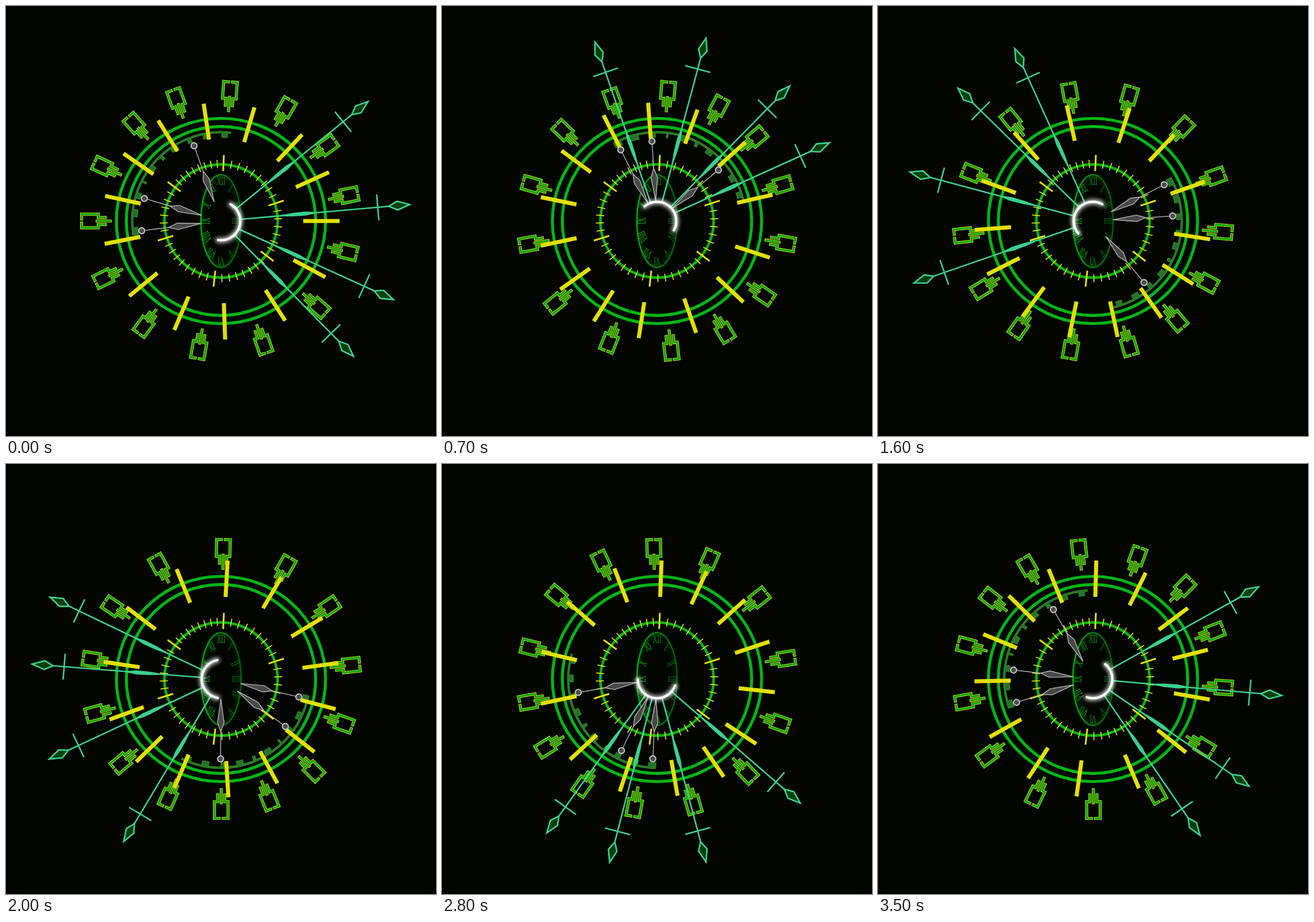
Recreate the animation shown at these times as an HTML page. Size 748 by 748 pixels, loop 3600 ms.

```html
<!DOCTYPE html>
<html lang="en">
<head>
<meta charset="utf-8">
<title>Clockwork</title>
<style>
  html, body { margin: 0; width: 100%; height: 100%; overflow: hidden; background: #020500; }
  svg { display: block; width: 100vw; height: 100vh; }
  text { font-family: "Liberation Serif", "Noto Serif", serif; font-size: 21px; text-anchor: middle; }
</style>
</head>
<body>
<svg viewBox="-374 -374 748 748">
  <defs>
    <filter id="glow" x="-60%" y="-60%" width="220%" height="220%">
      <feGaussianBlur stdDeviation="3.5"/>
    </filter>
    <linearGradient id="fade" gradientUnits="userSpaceOnUse" x1="-36" x2="36" y1="0" y2="0">
      <stop offset="0" stop-color="#08a812"/>
      <stop offset="1" stop-color="#045c08"/>
    </linearGradient>
    <g id="key">
      <path d="M3.6 2H11.8V31H6.2V43M-3.6 2H-11.8V31H-6.2V43M0 29V52" transform="translate(0 -244.5)"/>
    </g>
    <g id="spear" stroke="#3ad08e" stroke-width="2.6">
      <path d="M35 0H293M273.7 -22.6V22.6" fill="none"/>
      <path d="M92 0L125 -3L148 -3.5L173 0L148 3.5L125 3Z" fill="#3ad08e" stroke="none"/>
      <path d="M293 0L308 -7.6L329.5 0L308 7.6Z" fill="#06400c"/>
    </g>
    <g id="pin" stroke="#b4b4b4" stroke-width="1.4">
      <path d="M92 0H134"/>
      <path d="M35 0L76 -5.6L92 0L76 5.6Z" fill="#484848"/>
      <circle cx="139" r="5.2" fill="#4c4c4c" stroke="#c4c4c4" stroke-width="2"/>
    </g>
  </defs>
  <rect x="-374" y="-374" width="748" height="748" fill="#020500"/>
  <g fill="none" stroke="#02b616" stroke-width="5.2">
    <ellipse rx="182" ry="178.5"/>
    <ellipse rx="164.7" ry="164.3"/>
    <circle r="98.5" stroke-width="4.6"/>
  </g>
  <g id="dial" stroke="#e6e200"></g>
  <g fill="none" stroke="url(#fade)">
    <ellipse rx="33" ry="78" stroke-width="5" opacity=".3" filter="url(#glow)"/>
    <ellipse rx="35" ry="80.5" stroke-width="2.4"/>
  </g>
  <g id="numerals" stroke-width=".5"></g>
  <g id="gear"></g>
  <g id="keys" fill="none" stroke-linecap="butt"></g>
  <g id="bars" stroke="#e3e000" stroke-width="7"></g>
  <g id="spears"></g>
  <g id="pins"></g>
  <g id="moon" fill="none" stroke="#fff" stroke-linecap="round"></g>
</svg>
<script>
const byId = id => document.getElementById(id);
const rad = deg => deg * Math.PI / 180;
const polar = (r, deg) => `${(r * Math.cos(rad(deg))).toFixed(2)} ${(r * Math.sin(rad(deg))).toFixed(2)}`;
const arc = (r, from, to) => `M${polar(r, from)}A${r} ${r} 0 0 1 ${polar(r, to)}`;
const spoke = (r1, r2, deg) => `M${polar(r1, deg)}L${polar(r2, deg)}`;
const path = (d, attrs = '') => `<path d="${d}" ${attrs}/>`;
const use = (id, deg) => `<use href="#${id}" transform="rotate(${deg})"/>`;

// Inner dial: long marks with evenly divided short marks between them
const marks = [-87.5, -18, 37.3, 96.5, 162.8, 216.2, 272.5];
const divisions = [9, 7, 8, 9, 7, 9];
byId('dial').innerHTML = divisions.map((n, i) => {
  const step = (marks[i + 1] - marks[i]) / n;
  let short = '';
  for (let k = 1; k < n; k++) short += spoke(92.5, 106.5, marks[i] + k * step);
  return path(spoke(87, 115, marks[i]), 'stroke-width="3"') + path(short, 'stroke-width="1.7"');
}).join('');

// Numerals crowd slightly towards the sides of the oval
const shade = x => `rgb(5,${Math.round(122 - x)},12)`;
byId('numerals').innerHTML =
  ['XII', 'I', 'II', 'III', 'IV', 'V', 'VI', 'VII', 'VIII', 'IX', 'X', 'XI'].map((label, i) => {
    const deg = i * 30, a = rad(deg + 8 * Math.sin(rad(2 * deg)));
    const x = 27.5 * Math.sin(a), y = -70.5 * Math.cos(a);
    return `<text y="7" fill="${shade(x)}" stroke="${shade(x)}" transform="translate(${x} ${y}) rotate(${deg}) scale(.52 1)">${label}</text>`;
  }).join('');

// Gear segment: thin rim with teeth of uneven width
const teeth = [[173.2, 13], [185.2, 13], [197, 10], [206.8, 3], [217, 12],
               [227.2, 5], [237.3, 12], [248.6, 7], [260.4, 12], [272.4, 10]];
const rim = arc(154.4, 170.8, 276.5);
byId('gear').innerHTML =
  path(rim, 'fill="none" stroke="#35961f" stroke-width="4"') +
  teeth.map(([deg, w]) =>
    `<rect x="145.5" y="${-w / 2}" width="8" height="${w}" fill="#25732c" stroke="#35961f" transform="rotate(${deg})"/>`).join('') +
  path(rim, 'fill="none" stroke="#25732c" stroke-width="2"');

const keyAngles = [13.7, 41.5, 71, 99.8, 126.2, 153.9, 180, 204.8, 228.3, 249.9, 273.9, 299.9, 324.7, 348.6];
const keyLayer = keyAngles.map(a => use('key', a + 90)).join('');
byId('keys').innerHTML =
  `<g stroke="#d4e000" stroke-width="5.2" stroke-linecap="square">${keyLayer}</g>` +
  `<g stroke="#02a814" stroke-width="3.3" stroke-linecap="square">${keyLayer}</g>`;

const barAngles = [0, 28.3, 57.2, 88, 113.2, 140.7, 168.9, 192.2, 214.7, 238, 261.6, 286.4, 313.2, 335.7];
byId('bars').innerHTML = path(barAngles.map(a => spoke(143, 206.2, a)).join(''));
byId('spears').innerHTML = [-39.1, -5, 24.5, 45.6].map(a => use('spear', a)).join('');
byId('pins').innerHTML = [-109.7, -163.6, 173].map(a => use('pin', a)).join('');

const crescent = arc(33.5, -60.5, 99);
byId('moon').innerHTML =
  path(crescent, 'stroke-width="8" opacity=".85" filter="url(#glow)"') +
  path(crescent, 'stroke-width="4"');

const clockwise = ['gear', 'keys', 'pins'].map(byId);
const counter = ['bars', 'spears', 'moon'].map(byId);
const turn = (parts, deg) => parts.forEach(p => p.setAttribute('transform', `rotate(${deg})`));

// Ten degrees every 100 ms, in hard steps
function render(ms) {
  const deg = Math.floor(ms / 100) % 36 * 10;
  turn(clockwise, deg);
  turn(counter, -deg);
}

let start;
function tick(now) {
  start ??= now;
  render(now - start);
  requestAnimationFrame(tick);
}
render(0);
requestAnimationFrame(tick);
</script>
</body>
</html>
```
